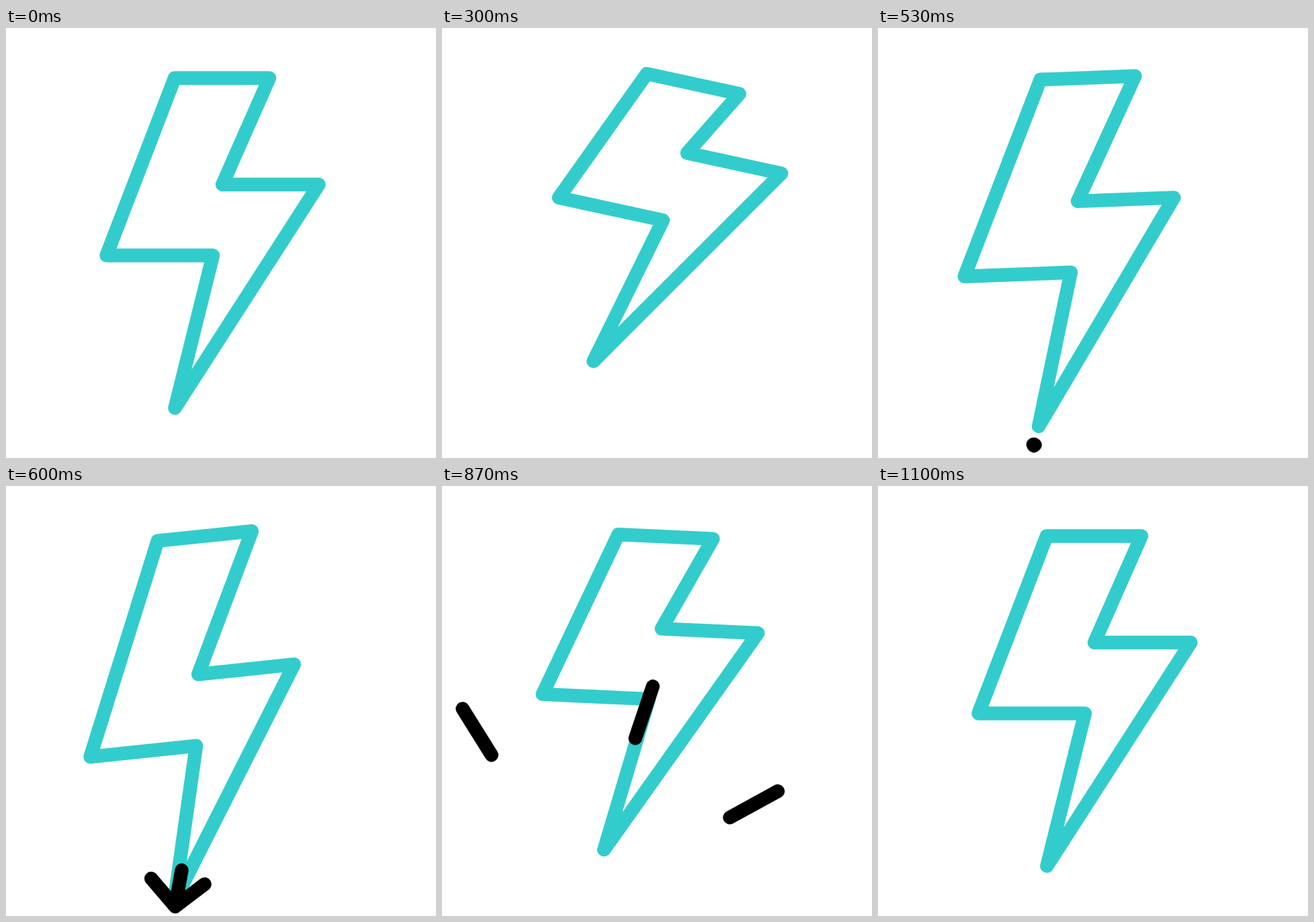
Write an HTML page that moves like this. It is 640 px wide and 640 px high and loops after 1.67 s.

```html
<!DOCTYPE html>
<html lang="en">
<head>
<meta charset="utf-8">
<title>Lightning bolt</title>
<style>
  html, body { margin: 0; width: 100%; height: 100%; overflow: hidden; background: #fff; }
  svg { display: block; width: 100%; height: 100%; }
  path { fill: none; stroke-width: 20.4; stroke-linecap: round; stroke-linejoin: round; }
</style>
</head>
<body>
<svg viewBox="0 0 640 640">
  <g id="group">
    <path id="bolt" stroke="#3cc"/>
    <path id="rays" stroke="#000"/>
  </g>
</svg>
<script>
const LOOP = 1670, STEP = 33.35;

// The bolt turns while its lower part slides by dx, dy
const rest = { angle: 0, dx: 0, dy: 0 };
const windUp = { angle: 13, dx: 13.5, dy: -59.5 };
const strike = { angle: -5.95, dx: -31.5, dy: 45.4 };
const rebound = { angle: 4.3, dx: 5.9, dy: -34.4 };

const [group, bolt, rays] = ["group", "bolt", "rays"].map(id => document.getElementById(id));

function ease(from, to, k) {
  const t = Math.min(1, Math.max(0, (k - from) / (to - from)));
  return t * t * t * (t * (6 * t - 15) + 10);
}

function pose(k) {
  const up = ease(0, 11.25, k), down = ease(11.25, 18.3, k);
  const back = ease(18.3, 29.3, k), settle = ease(29.3, 32.4, k);
  const value = name => windUp[name] * up
    + (strike[name] - windUp[name]) * down
    + (rebound[name] - strike[name]) * back
    + (rest[name] - rebound[name]) * settle;
  return ["angle", "dx", "dy"].map(value);
}

function boltPath(dx, dy) {
  // Top edge, then relative steps around the lower part
  return `M251,74.5H392L${322 + dx},${233 + dy}h143.5l-214,332.5l56.5,-227h-158.5Z`;
}

// Three rays burst from the tip: the head runs out first, the tail follows
function rayPath(k) {
  const head = 333.5 * ease(15.17, 24.56, k);
  const tail = 333.5 * ease(18.03, 30.4, k);
  if (head - tail < .1) return "";
  return [-124.6, -74, -31.3].map(degrees => {
    const a = degrees * Math.PI / 180;
    const at = d => [220.7 + d * Math.cos(a), 618.6 + d * Math.sin(a)];
    return `M${at(tail)}L${at(head)}`;
  }).join("");
}

function draw(now) {
  const k = Math.floor((now % LOOP + 5) / STEP);
  const [angle, dx, dy] = pose(k);
  group.setAttribute("transform", `rotate(${angle} 307.5 322)`);
  bolt.setAttribute("d", boltPath(dx, dy));
  rays.setAttribute("d", rayPath(k));
}

function tick() {
  draw(performance.now());
  requestAnimationFrame(tick);
}
tick();
</script>
</body>
</html>
```
